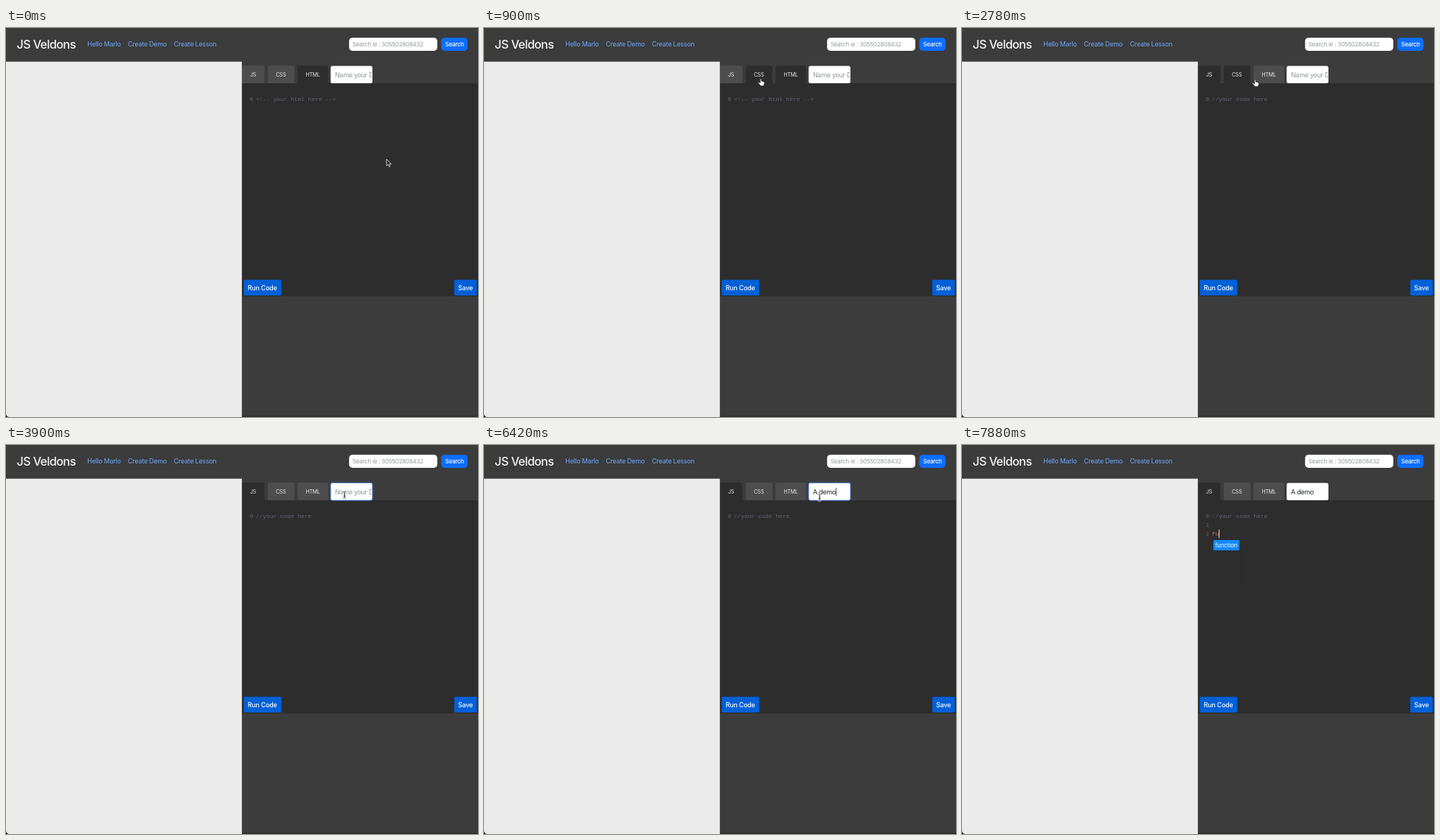
These frames come from a looping animation (640 by 528 pixels, 8 s). An HTML page:

```html
<!DOCTYPE html>
<html lang="en">
<head>
<meta charset="utf-8">
<title>Code lessons</title>
<style>
  html, body { margin: 0; width: 100%; height: 100%; overflow: hidden; background: #3c3c3c; }
  svg { display: block; width: 640px; height: 528px; }
  text { font-family: Inter, Roboto, sans-serif; white-space: pre; }
  .brand { font-size: 16px; letter-spacing: -.55px; font-weight: 450; fill: #f4f4f4; }
  .link { font-size: 8.9px; letter-spacing: -.23px; fill: #6ea8fe; }
  .hint { font-size: 8px; letter-spacing: -.22px; fill: #94989c; }
  .btn { font-size: 8.8px; letter-spacing: -.15px; font-weight: 500; fill: #fff; }
  .small { font-size: 8px; letter-spacing: -.25px; }
  .tab { font-size: 6.9px; letter-spacing: -.1px; fill: #f0f0f0; }
  .field { font-size: 9px; letter-spacing: -.3px; }
  .code, .num { font-family: "Liberation Mono", "DejaVu Sans Mono", monospace; font-size: 7.87px; }
  .num { font-size: 7px; fill: #6e6e74; }
  .code { fill: #656572; }
</style>
</head>
<body>
<svg viewBox="0 0 640 528" xmlns="http://www.w3.org/2000/svg">
  <defs>
    <clipPath id="clip"><rect x="441" y="52" width="55" height="23"/></clipPath>
  </defs>
  <rect width="640" height="528" fill="#3c3c3c"/>
  <rect y="45.7" width="319.8" height="482.3" fill="#ebebeb"/>
  <path d="M0 524 Q.5 527.5 4 528 H0Z" fill="#111"/>
  <rect x="320" y="75" width="320" height="289.2" fill="#2d2d2d"/>
  <rect x="320" y="526.5" width="320" height="1.5" fill="#2b2b2b"/>

  <text class="brand" x="14.5" y="28.3">JS Veldons</text>
  <text class="link" x="110.3" y="25.3">Hello Marlo</text>
  <text class="link" x="165.3" y="25.3">Create Demo</text>
  <text class="link" x="227.8" y="25.3">Create Lesson</text>
  <rect x="465.2" y="13.3" width="119.6" height="17.6" rx="4.5" fill="#fff"/>
  <text class="hint" x="469.7" y="25.1">Search ie : 305502808432</text>
  <rect x="590.2" y="13.3" width="35.6" height="17.6" rx="4.5" fill="#0d6efd"/>
  <text class="btn small" x="595.5" y="25.1">Search</text>

  <g id="tabs"></g>

  <rect x="440.2" y="51.4" width="56.6" height="23.6" rx="2.5" fill="#fff"/>
  <rect id="focus" x="440" y="51.2" width="57" height="24" rx="2.5" fill="none" stroke="#3f78d2" stroke-width="1"/>
  <g clip-path="url(#clip)">
    <text id="name" class="field" x="445.9" y="67"></text>
    <rect id="nameCaret" y="58" width=".8" height="11" fill="#222"/>
  </g>
  <g id="history">
    <text class="hint" x="446" y="92">a demo</text>
    <text class="hint" x="446" y="115">a demo 2</text>
    <text class="hint" x="446" y="138">a demo 3</text>
  </g>

  <text class="num" x="330.7" y="99.3">0</text>
  <text id="line0" class="code" x="338.8" y="99.3"></text>
  <text id="num1" class="num" x="330.7" y="111.1">1</text>
  <text id="num2" class="num" x="330.7" y="122.9">2</text>
  <text id="line2" class="code" x="338.8" y="122.9" style="fill:#d9705c"></text>
  <rect id="codeCaret" width=".9" height="11.5" fill="#f0f0f0"/>
  <g id="popup">
    <path d="M379.6 134 V187" stroke="#292929" stroke-width=".8"/>
    <rect x="340.8" y="129" width="35.3" height="14" rx="1" fill="#1388fb"/>
    <text class="small" x="343.2" y="138.9" fill="#fff" style="letter-spacing:-.1px">function</text>
  </g>

  <rect x="322.3" y="341.7" width="51" height="21.2" rx="1.5" fill="#0060d8"/>
  <text class="btn" x="327.8" y="355.6">Run Code</text>
  <rect x="607.8" y="341.7" width="30.7" height="21.2" rx="1.5" fill="#0060d8"/>
  <text class="btn" x="613" y="355.6">Save</text>

  <g id="pointer">
    <path id="arrow" d="M0 0 V9 L2 7.2 L3.4 10.4 L5 9.7 L3.6 6.6 H6.3Z" fill="#222" stroke="#f2f2f2" stroke-width=".8" stroke-linejoin="round"/>
    <path id="hand" d="M-.9 .6 Q0 -.5 .8 .6 V3.2 Q1.7 2.6 2.3 3.5 Q3.2 3 3.6 4 Q4.9 3.7 4.9 5 V6.4 Q4.7 7.6 4 8.4 V9.6 H-.8 V8.8 L-3.6 5.5 Q-3.6 4.3 -2.4 4.7 L-.9 5.7Z" fill="#fff" stroke="#222" stroke-width=".7" stroke-linejoin="round"/>
    <g id="beam" fill="none">
      <path d="M-2.2 -4.4 Q0 -4.4 0 -3.2 V3.2 Q0 4.4 -2.2 4.4 M2.2 -4.4 Q0 -4.4 0 -3.2 V3.2 Q0 4.4 2.2 4.4 M-1.4 1.4 H1.4" stroke="#fff" stroke-width="2"/>
      <path d="M-2.2 -4.4 Q0 -4.4 0 -3.2 V3.2 Q0 4.4 -2.2 4.4 M2.2 -4.4 Q0 -4.4 0 -3.2 V3.2 Q0 4.4 2.2 4.4 M-1.4 1.4 H1.4" stroke="#333" stroke-width=".75"/>
    </g>
  </g>
</svg>
<script>
const LOOP = 8000, STEP = 20;
const $ = id => document.getElementById(id);
const show = (id, on) => $(id).setAttribute("display", on ? "inline" : "none");
const put = (id, s) => { if ($(id).textContent !== s) $(id).textContent = s; };
const within = (t, a, b) => t >= a && t < b;

// Latest value in a list of [time, value]
const at = (list, t) => list.reduce((v, [when, next]) => t >= when ? next : v, list[0][1]);

const tabs = [["JS", 320, 30.4, 331], ["CSS", 355, 36, 365.9], ["HTML", 395.3, 41.5, 406.4]];
$("tabs").innerHTML = tabs.map(([s, x, w, tx]) =>
  `<path id="tab${s}" d="M${x} 75 V53 q0 -2 2 -2 h${w - 4} q2 0 2 2 V75Z"/>
   <text class="tab" x="${tx}" y="66">${s}</text>`).join("");

const active = [[0, "HTML"], [1600, "CSS"], [2500, "JS"]];
const hover = [[0, ""], [840, "CSS"], [2060, "JS"], [2740, "CSS"], [2800, "HTML"], [2900, ""]];
const comment = [[0, "<!-- your html here -->"], [1600, "/* your css here */"], [2500, "//your code here"]];
const typed = [[0, ""], [3980, "a"], [4260, "ad"], [4480, "a"], [4700, ""], [5260, "A"],
  [5520, "A "], [5600, "A d"], [5680, "A de"], [5740, "A dem"], [5820, "A demo"]];
const code = [[0, ""], [7520, "f"], [7800, "fu"]];

// Pointer tip: time, x, y
const moves = [
  [[0, 516, 178], [20, 518, 181], [160, 612, 330], [260, 480, 341], [370, 335, 300],
   [480, 342, 130], [590, 430, 22], [680, 382, 58], [740, 374, 68], [840, 375, 68.5], [900, 375.3, 69]],
  [[1860, 375.3, 69], [1960, 364, 67.5], [2100, 350, 66], [2300, 345, 67]],
  [[2680, 345, 67], [2780, 397.5, 70], [2900, 437, 70], [3060, 455, 68], [3240, 459, 67.8]],
  [[6040, 457, 68.5], [6400, 457, 68.5], [6420, 455, 71], [6540, 451, 88], [6680, 443, 110], [6860, 436.7, 118.4]]
];

function spline(a, b, c, d, u) {
  return b + .5 * u * (c - a + u * (2 * a - 5 * b + 4 * c - d + u * (3 * (b - c) + d - a)));
}

function tip(t) {
  const p = moves.filter(m => t >= m[0][0]).pop(), last = p.length - 1;
  if (t >= p[last][0]) return p[last].slice(1);
  const i = p.findIndex(k => k[0] > t) - 1;
  const u = (t - p[i][0]) / (p[i + 1][0] - p[i][0]);
  const q = [i - 1, i, i + 1, i + 2].map(n => p[Math.max(0, Math.min(last, n))]);
  return [1, 2].map(n => spline(...q.map(k => k[n]), u));
}

function drawPointer(t) {
  const [x, y] = tip(t);
  const onTab = y > 51 && y < 75 && tabs.some(k => x >= k[1] && x <= k[1] + k[2] + 1);
  const onButton = y > 341 && y < 363 && (x < 373 || x > 607);
  const onField = y > 51 && y < 75 && x >= 440 && x <= 497;
  const kind = onTab || onButton ? "hand" : onField ? "beam" : "arrow";
  ["arrow", "hand", "beam"].forEach(k => show(k, k === kind));
  show("pointer", !within(t, 3980, 6040) && t < 7060);
  $("pointer").setAttribute("transform", `translate(${x.toFixed(2)} ${y.toFixed(2)})`);
}

function drawField(t) {
  const s = at(typed, t), focused = within(t, 3220, 6860);
  put("name", s || "Name your Demo");
  $("name").setAttribute("fill", s ? "#212529" : "#92979c");
  show("focus", focused);
  show("nameCaret", focused && !within(t, 3900, 3980) && !within(t, 5060, 5260));
  $("nameCaret").setAttribute("x", 445.9 + (s ? $("name").getComputedTextLength() : 0));
  show("history", within(t, 4280, 4560));
}

function drawEditor(t) {
  const word = at(code, t), row = at([[0, 0], [7240, 1], [7280, 2]], t);
  put("line0", at(comment, t));
  put("line2", word);
  show("num1", row > 0);
  show("num2", row > 1);
  show("popup", t >= 7880);
  show("codeCaret", t >= 6860);
  const column = row ? word.length : 16;
  $("codeCaret").setAttribute("x", 338.8 + column * 4.722);
  $("codeCaret").setAttribute("y", 91.2 + row * 11.8);
}

function draw(ms) {
  const t = Math.floor(ms % LOOP / STEP) * STEP;
  for (const [s] of tabs) {
    const dark = s === at(active, t) || s === at(hover, t);
    $("tab" + s).setAttribute("fill", dark ? "#2d2d2d" : "#4d4d4d");
  }
  drawField(t);
  drawEditor(t);
  drawPointer(t);
}

const start = performance.now();
function tick() {
  draw(performance.now() - start);
  requestAnimationFrame(tick);
}
tick();
</script>
</body>
</html>
```
